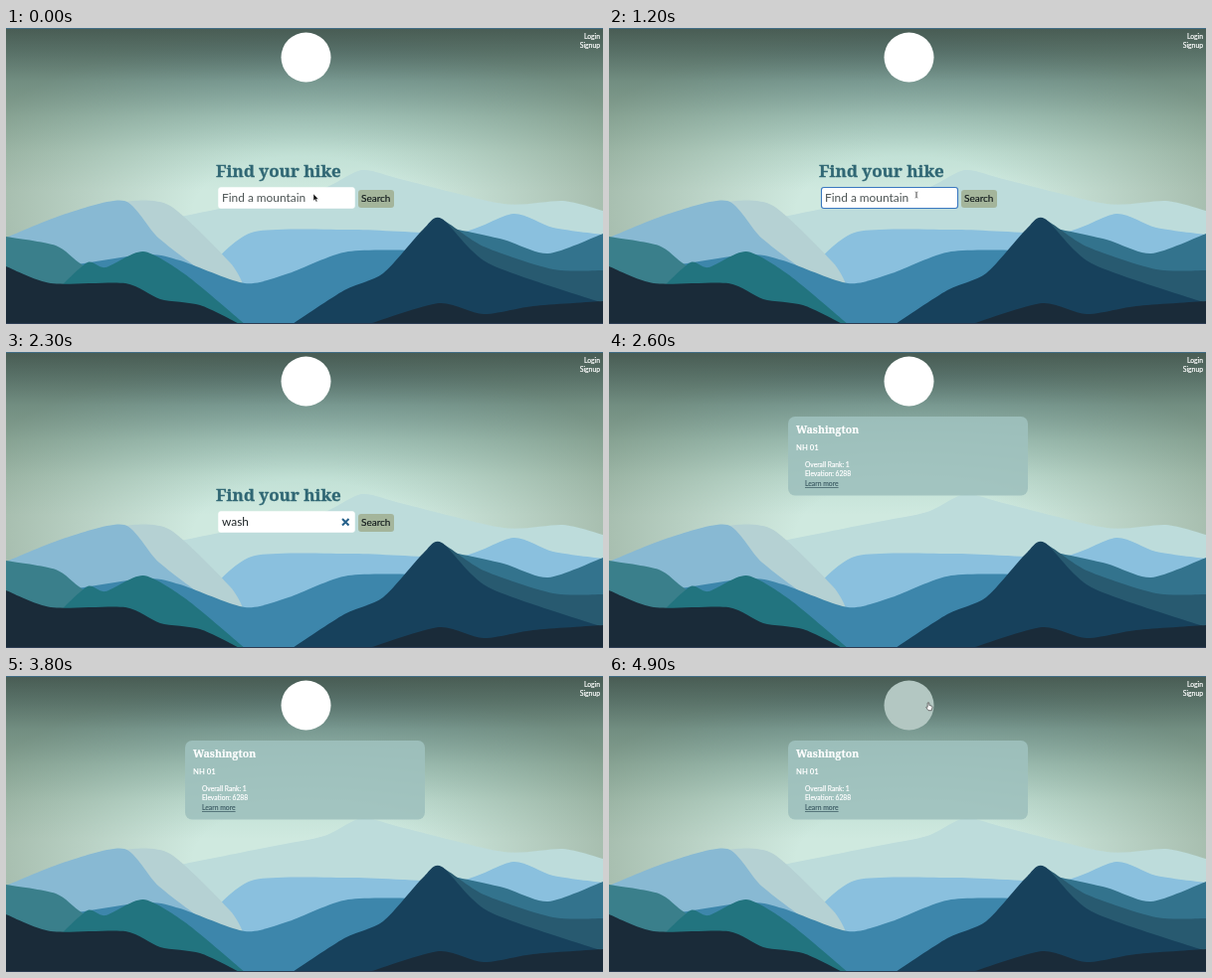
An HTML page that plays this animation: 600x298 px, repeating every 5 s.

```html
<!DOCTYPE html>
<html lang="en">
<head>
<meta charset="utf-8">
<title>Find your hike</title>
<style>
  html, body { margin: 0; width: 100%; height: 100%; overflow: hidden; background: #1a2b39; }
  svg { display: block; width: 100%; height: 100%; font-family: Lato, sans-serif; }
  .slab { font-family: "Noto Serif", serif; font-weight: 700; }
  .field { font-size: 11.9px; }
  .nav { font-size: 6.8px; fill: #fff; stroke: #fff; stroke-width: .2; text-anchor: end; }
  .info { font-size: 6.7px; fill: #fff; stroke: #fff; stroke-width: .2; }
</style>
</head>
<body>
<svg viewBox="0 0 600 298" preserveAspectRatio="none">
  <defs>
    <linearGradient id="sky" x2="0" y2="1">
      <stop offset="0" stop-color="#33494f"/>
      <stop offset=".08" stop-color="#527175"/>
      <stop offset=".18" stop-color="#83a9a7"/>
      <stop offset=".3" stop-color="#a8ccc3"/>
      <stop offset=".42" stop-color="#c1e0d5"/>
      <stop offset=".55" stop-color="#cfe9df"/>
    </linearGradient>
    <radialGradient id="edge" cx=".5" cy=".62" r=".62">
      <stop offset=".3" stop-color="#5f7058" stop-opacity="0"/>
      <stop offset="1" stop-color="#5f7058" stop-opacity=".48"/>
    </radialGradient>
  </defs>
  <rect width="600" height="298" fill="url(#sky)"/>
  <rect width="600" height="298" fill="url(#edge)"/>
  <g id="hills"></g>
  <rect width="600" height="1" fill="#3f6b83"/>
  <rect y="297" width="600" height="1" fill="#2d3d54"/>

  <circle id="logo" cx="301.5" cy="29.5" r="25"/>
  <text class="nav" x="597" y="11">Login</text>
  <text class="nav" x="597" y="20">Signup</text>

  <g id="search">
    <text class="slab" x="211" y="150" font-size="17" fill="#306774" stroke="#306774" stroke-width=".3">Find your hike</text>
    <rect id="box" x="213.5" y="160.5" width="137" height="21" rx="2.5" fill="#fff"/>
    <text id="query" class="field" x="217" y="175.3"></text>
    <rect id="caret" y="164" width=".8" height="14" fill="#444"/>
    <path id="clear" d="M338 168l6.5 6.5m0-6.5l-6.5 6.5" stroke="#255f89" stroke-width="2"/>
    <rect x="354" y="163" width="36" height="18" rx="3" fill="#a4b59b"/>
    <text x="357" y="175.3" font-size="10" fill="#10181a" stroke="#10181a" stroke-width=".15">Search</text>
    <g id="hint">
      <path d="M254 186h5l4-4 4 4h17v18h-30z" fill="#fff"/>
      <text x="259" y="197" font-size="5.8" fill="#222">wash</text>
    </g>
  </g>

  <g id="result">
    <rect x="180" y="65" width="241" height="79.5" rx="7" fill="#9fc1be" fill-opacity=".9"/>
    <text class="slab" x="188" y="81.5" font-size="10.5" fill="#fff" stroke="#fff" stroke-width=".2">Washington</text>
    <text x="188" y="99.3" font-size="7.7" font-weight="700" fill="#fff">NH 01</text>
    <text class="info" x="197" y="115.5">Overall Rank: 1</text>
    <text class="info" x="197" y="125.3">Elevation: 6288</text>
    <text x="197" y="135.2" font-size="6.8" fill="#35545d" stroke="#35545d" stroke-width=".1" text-decoration="underline">Learn more</text>
  </g>

  <path id="arrow" d="M0 0v7l1.6-1.4 1.1 2.5 1.2-.5-1.1-2.4h2.2z" fill="#111" stroke="#fff" stroke-width=".4"/>
  <path id="beam" d="M-1.5-3q1.5 0 1.5 1v4q0 1-1.5 1m3-6q-1.5 0-1.5 1v4q0 1 1.5 1" transform="translate(309 168)" fill="none" stroke="#444" stroke-width=".6"/>
  <path id="hand" d="M-.8-1q.8-.9 1.6 0v2.5l2.5.7q.9.3.6 1.6l-.7 2.9h-3.2l-2.2-3q.3-1.1 1.4-.3z" fill="#fff" stroke="#222" stroke-width=".6"/>
</svg>
<script>
const $ = id => document.getElementById(id);
const LOOP = 5000, STEP = 100;

// Ridges from far to near: colour and the key points of the skyline.
const ridges = [
  ["#bddcdb", "150,195 265,172 320,161 358,143 400,153 500,177 560,174 600,184"],
  ["#8ac0de", "208,236 250,205 350,203 455,206 510,187 550,201 600,208"],
  ["#b5d1d3", "95,190 120,175 165,179 225,236 240,262"],
  ["#88b9d3", "0,211 60,187 119,174 154,212 212,256"],
  ["#3d86ab", "60,240 140,228 175,234 240,257 284,247 344,225 430,224"],
  ["#3a7f8b", "0,210 50,219 76,238 110,255"],
  ["#33738d", "440,200 500,213 545,227 600,207"],
  ["#22747f", "55,260 82,236 100,241 138,225 180,248 240,298"],
  ["#285a70", "425,205 438,193 480,220 550,243 600,244"],
  ["#17415c", "288,298 340,264 379,247 419,203 438,192 485,237 600,277"],
  ["#1a2b39", "0,240 45,257 120,257 155,273 195,279 235,298"],
  ["#1a2b39", "365,298 435,277 480,288 530,280 600,275"]
];

// Smooth curve through the key points, closed along the bottom.
function ridgePath(text) {
  const pts = text.split(" ").map(p => p.split(",").map(Number));
  const at = i => pts[Math.max(0, Math.min(pts.length - 1, i))];
  const pull = (a, from, to) => a.map((v, j) => v + (to[j] - from[j]) / 8);
  let d = `M${pts[0][0]} 298L${pts[0]}`;
  for (let i = 0; i < pts.length - 1; i++) {
    d += `C${pull(at(i), at(i - 1), at(i + 1))} ${pull(at(i + 1), at(i + 2), at(i))} ${at(i + 1)}`;
  }
  return d + "V298Z";
}

$("hills").innerHTML = ridges
  .map(([color, pts]) => `<path d="${ridgePath(pts)}" fill="${color}"/>`).join("");

const FOCUS = 500, TYPE = 1400, KEY = 200, PICK = 1900, SUBMIT = 2200, RESULT = 2600;
const MOVE = 3900, TRAVEL = 600;

const show = (id, on) => $(id).setAttribute("visibility", on ? "inherit" : "hidden");
const set = (id, attrs) => {
  for (const name in attrs) $(id).setAttribute(name, attrs[name]);
};
const mix = (a, b, k) => a + (b - a) * k;

function typed(t) {
  if (t >= PICK) return "wash";
  return "wa".slice(0, Math.max(0, Math.floor((t - TYPE) / KEY) + 1));
}

function draw(ms) {
  const t = Math.floor((ms % LOOP) / STEP) * STEP;
  const query = typed(t);
  const focused = t >= FOCUS && t < SUBMIT;
  const blink = Math.floor((t - FOCUS) / 500) % 2 === 0;

  show("search", t < RESULT);
  show("result", t >= RESULT);
  $("query").textContent = query || "Find a mountain";
  set("query", { fill: query ? "#1d2426" : "#4c5454" });
  set("box", { stroke: focused ? "#3a78c0" : "#fff", "stroke-width": focused ? 1.1 : .5 });
  set("caret", { x: 217 + (query ? $("query").getComputedTextLength() : 0) });
  show("caret", focused && (query || blink));
  show("clear", t < RESULT && query);
  show("hint", t < PICK && query.length > 1);

  // The pointer leaves the search field for the logo, which dims under it.
  const k = Math.max(0, Math.min(1, (t - MOVE) / TRAVEL));
  const ease = k * k * (3 - 2 * k);
  const x = mix(309, 321, ease), y = mix(167, 28, ease);
  const hover = Math.hypot(x - 301.5, y - 29.5) < 25;
  const place = { transform: `translate(${x} ${y})` };
  set("arrow", place);
  set("hand", place);
  show("arrow", t < 200 || (t >= MOVE && !hover));
  show("beam", t >= 200 && t < TYPE);
  show("hand", hover);
  set("logo", { fill: hover ? "#b3c7c2" : "#fff" });
}

const start = performance.now();
function tick() {
  draw(performance.now() - start);
  requestAnimationFrame(tick);
}
tick();
</script>
</body>
</html>
```
